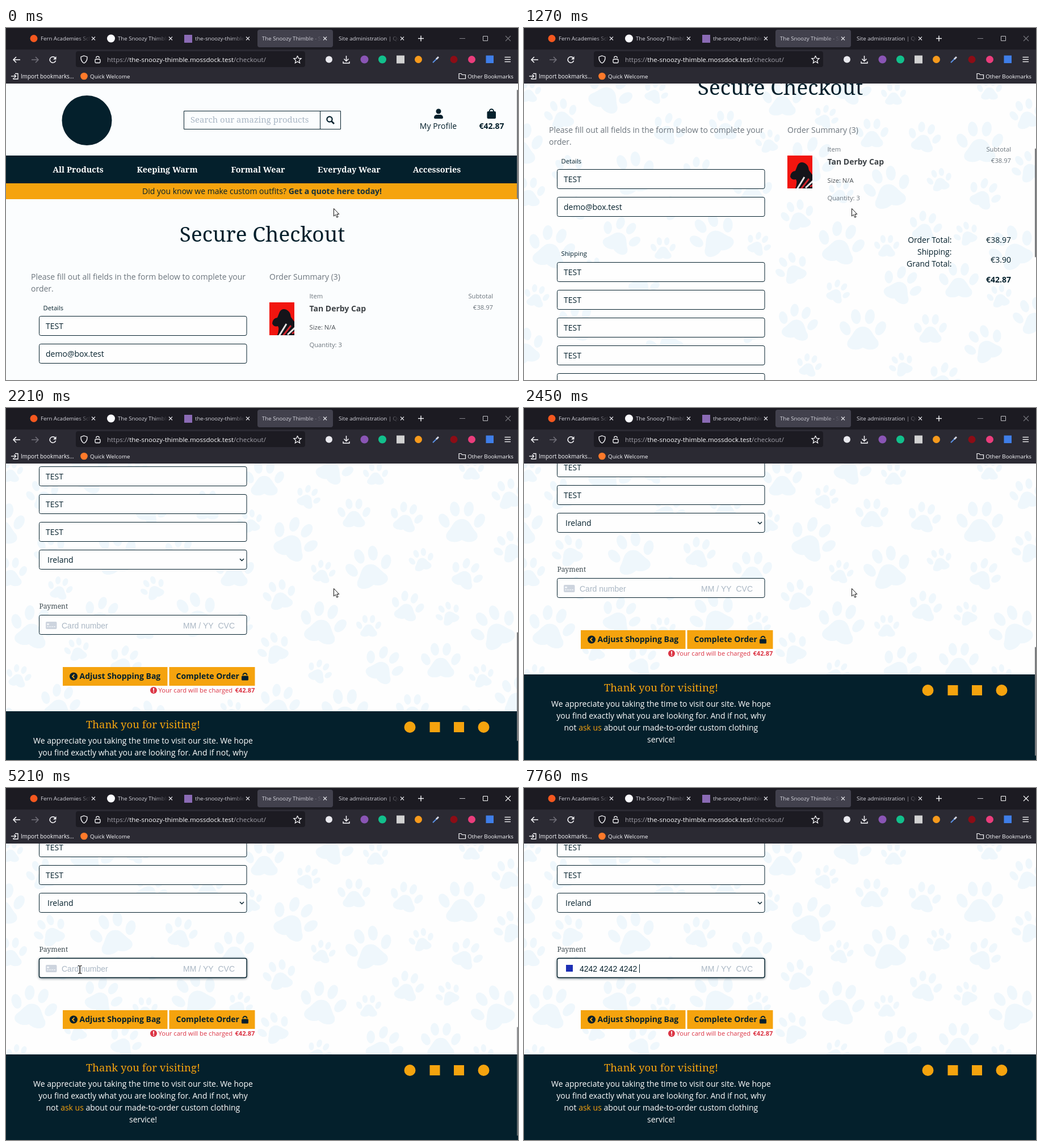
Animation, 902 px wide and 621 px high, one loop 8 s. Source, as an HTML page with a canvas:

```html
<!DOCTYPE html>
<html lang="en">
<head>
<meta charset="utf-8">
<title>Checkout</title>
<style>
html, body { margin: 0; width: 100%; height: 100%; overflow: hidden; background: #fefefe; }
canvas { display: block; }
</style>
</head>
<body>
<canvas id="stage" width="902" height="621"></canvas>
<script>
const c = document.getElementById('stage').getContext('2d');
const LOOP = 8000, TOP = 98, W = 902, H = 621;
const SANS = '"Open Sans", sans-serif', SERIF = '"Noto Serif", serif', ARIAL = '"Liberation Sans", sans-serif';
const INK = '#04202c', AMBER = '#f5a30e', GREY = '#6c757d', RED = '#dc3545', LIGHT = '#fbfbfe';

// Timelines: [time, value...]; each value holds until the next one
const SCROLL = [[0, 0], [880, 69], [1000, 100], [1150, 169], [1270, 259], [1390, 300], [1540, 369],
  [1660, 401], [1810, 470], [1930, 501], [2090, 570], [2210, 716], [2330, 769], [2450, 781]];
const POINTER = [[0, 577, 318, 'arrow'], [2600, 330, 317, 'beam'], [2720, 160, 317, 'beam'],
  [2870, 83, 317, 'beam'], [3120, 94, 318, 'beam'], [3240, 106, 319, 'beam'], [3360, 118, 320, 'beam'],
  [3480, 123, 320, 'beam'], [4680, 130, 320, 'beam'], [5480, 0, 0, 'none']];
const TYPED = [[0, 0], [5480, 1], [5730, 2], [5990, 3], [6110, 5], [6390, 6], [6510, 7],
  [6790, 8], [6940, 10], [7240, 11], [7360, 12], [7640, 13], [7760, 15]];
const CARET = [[0, 0], [4410, 1], [4960, 0], [5480, 1], [7090, 0], [7240, 1]];
const FOCUS = [[0, 0], [4410, 0.5], [4530, 1]];
const THUMB = [[0, 1], [5210, 0.8], [5330, 0.4], [5480, 0]];
const CARD = '4242 4242 4242 ';

const PAWS = {
  22: [651, 117, 532, 157, 732, 268, 558, 289, 779, 363, 639, 385, 552, 465, 838, 473, 502, 595, 665, 594,
    820, 108, 232, 113, 430, 200, 95, 318, 259, 318, 245, 389, 413, 381, 125, 426, 22, 473, 395, 535, 8, 112],
  29: [613, 186, 811, 293, 482, 330, 707, 350, 472, 424, 716, 531, 741, 618, 65, 152, 308, 255, 78, 252,
    8, 290, 210, 447, 885, 152, 705, 193, 888, 245, 355, 172, 255, 178],
  35: [766, 446, 665, 454, 897, 508, 482, 520, 811, 558, 402, 285, 170, 367, 0, 562, 95, 520, 250, 550, 455, 125, 577, 102],
  41: [803, 202, 508, 232, 640, 282, 558, 380, 860, 388, 597, 533, 150, 112, 190, 257, 48, 387, 333, 365, -8, 205]
};

const at = (list, t) => list.reduce((now, step) => step[0] <= t ? step : now);

function rect(x, y, w, h, fill, r = 0) {
  c.fillStyle = fill;
  c.beginPath();
  c.roundRect(x, y, w, h, r);
  c.fill();
}
function frame(x, y, w, h, color, width = 1, r = 0) {
  c.strokeStyle = color;
  c.lineWidth = width;
  c.beginPath();
  c.roundRect(x, y, w, h, r);
  c.stroke();
}
function disc(x, y, r, fill) {
  c.fillStyle = fill;
  c.beginPath();
  c.arc(x, y, r, 0, 7);
  c.fill();
}
function ring(x, y, r, color, width, from = 0, to = 7) {
  c.strokeStyle = color;
  c.lineWidth = width;
  c.beginPath();
  c.arc(x, y, r, from, to);
  c.stroke();
}
// Polyline from flat coordinates
function line(pts, color, width = 1.2) {
  c.strokeStyle = color;
  c.lineWidth = width;
  c.beginPath();
  for (let i = 0; i < pts.length; i += 2) c.lineTo(pts[i], pts[i + 1]);
  c.stroke();
}
function poly(d, fill) {
  c.fillStyle = fill;
  c.fill(new Path2D(d));
}
// y is the middle of the capitals
function text(s, x, y, size, color, { face = SANS, weight = 400, align = 'left' } = {}) {
  c.font = `${weight} ${size}px ${face}`;
  c.textAlign = align;
  c.fillStyle = color;
  c.fillText(s, x, Math.round(y + size * 0.36));
  return c.measureText(s).width;
}
function runs(x, y, size, parts) {
  for (const [s, color, weight = 400] of parts) x += text(s, x, y, size, color, { weight });
}

function paw(x, y, r, tilt) {
  c.save();
  c.translate(x, y);
  c.rotate(tilt);
  c.scale(r, r);
  poly('M0-.15C.35-.15.4.2.62.42C.85.8.3.95 0 .75C-.3.95-.85.8-.62.42C-.4.2-.35-.15 0-.15Z', '#eff7fc');
  for (const side of [-1, 1]) {
    for (const [tx, ty, turn] of [[0.76, -0.08, 0.5], [0.3, -0.58, 0.15]]) {
      c.beginPath();
      c.ellipse(tx * side, ty, 0.21, 0.32, turn * side, 0, 7);
      c.fill();
    }
  }
  c.restore();
}
function wallpaper() {
  for (const size in PAWS) {
    const spots = PAWS[size];
    for (let i = 0; i < spots.length; i += 2) paw(spots[i], spots[i + 1], +size, ((i * 3.5 + 2) % 5 - 2) * 0.24);
  }
}

function header() {
  disc(142.5, 163, 44, INK);
  frame(313.5, 146.5, 276, 32, INK);
  line([553.5, 146, 553.5, 179], INK, 1);
  text('Search our amazing products', 325, 162, 14.9, '#a9b6c4', { face: SERIF });
  ring(570, 161, 4.6, INK, 2.2);
  line([573.5, 164.5, 578, 169], INK, 2.6);
  disc(762, 147, 4.5, INK);
  rect(754, 153, 16, 7, INK, [5, 5, 2, 2]);
  text('My Profile', 761.5, 172.5, 14, INK, { align: 'center' });
  rect(847.5, 147, 15.5, 13, INK, 2);
  ring(855.3, 147, 3.7, INK, 2, Math.PI, 0);
  text('€42.87', 855.5, 172.5, 14, INK, { weight: 700, align: 'center' });

  rect(0, 225, W, 49, INK);
  const menu = [['All Products', 127], ['Keeping Warm', 284], ['Formal Wear', 444], ['Everyday Wear', 604.5], ['Accessories', 759]];
  for (const [s, x] of menu) text(s, x, 249.5, 14.4, '#fdfdfd', { face: SERIF, weight: 700, align: 'center' });
  rect(0, 274, W, 28, AMBER);
  runs(240, 288, 14, [['Did you know we make custom outfits? ', INK], ['Get a quote here today!', '#17303a', 700]]);
}

function field(y, value, x = 70) {
  rect(58.5, y + 0.5, 365.5, 34, '#fefefe', 3);
  frame(58.5, y + 0.5, 365.5, 34, INK, 1, 3);
  text(value, x, y + 17.5, 14, INK);
}

function form() {
  text('Secure Checkout', 451.5, 364, 37, INK, { face: SERIF, align: 'center' });
  text('Please fill out all fields in the form below to complete your', 44, 439, 14, GREY);
  text('order.', 44, 460, 14, GREY);
  text('Details', 65.5, 493.5, 11.2, INK);
  field(508, 'TEST');
  field(557, 'demo@box.test');
  text('Shipping', 65.5, 657, 11.2, INK);
  for (let i = 0; i < 6; i++) field(672 + i * 49, 'TEST');
  field(966, 'Ireland', 73);
  line([412, 982, 415.5, 985.5, 419, 982], INK, 1.5);
}

function photo() {
  c.save();
  c.beginPath();
  c.rect(464, 484, 44, 58);
  c.clip();
  rect(464, 484, 44, 58, '#f2150f');
  poly('M469 521Q470 512 478 511L482 501Q486 494 494 497Q501 500 502 510L508 518V542H478Q482 530 479 526Q471 528 469 521Z', '#15141a');
  for (let i = 0; i < 4; i++) {
    line([480 + i * 8, 545 - i * 2, 494 + i * 8, 522 + i * 3], i % 2 ? '#d2232b' : '#e8e4e4', 3);
  }
  c.restore();
}

function summary() {
  text('Order Summary (3)', 464, 439, 14, GREY);
  text('Item', 534.5, 472.5, 11.2, GREY);
  text('Subtotal', 858, 472.5, 11.2, GREY, { align: 'right' });
  photo();
  text('Tan Derby Cap', 534.5, 494.5, 14, '#3d4246', { weight: 700 });
  text('€38.97', 858, 493, 11.2, GREY, { align: 'right' });
  text('Size: N/A', 534.5, 528, 11.2, '#4a5055');
  text('Quantity: 3', 534.5, 558.5, 11.2, GREY);
  const right = { align: 'right' };
  ['Order Total:', 'Shipping:', 'Grand Total:'].forEach((s, i) => text(s, 753.5, 633 + i * 21, 14, INK, right));
  text('€38.97', 858, 633, 14, INK, right);
  text('€3.90', 858, 668, 14, INK, right);
  text('€42.87', 858, 703, 14, INK, { weight: 700, align: 'right' });
}

function payment(t) {
  const count = at(TYPED, t)[1], focus = at(FOCUS, t)[1];
  text('Payment', 58.5, 1066, 12.1, '#3d4a50', { face: SERIF });
  c.save();
  c.shadowColor = `rgba(4,32,44,${0.75 * focus})`;
  c.shadowBlur = 5;
  c.shadowOffsetY = 1;
  rect(58.5, 1081.5, 365.5, 34, '#fefefe', 3);
  c.restore();
  frame(58.5, 1081.5, 365.5, 34, INK, 1 + focus * 0.4, 3);

  const value = CARD.slice(0, count), y = 1099.5, hint = '#aab7c4';
  if (count) {
    rect(74, 1093, 12, 12, '#1c2fb4');
  } else {
    rect(70, 1093, 19.5, 13, '#cdd4de', 2);
    rect(72, 1096, 4, 3, '#eef1f5');
    for (let i = 0; i < 4; i++) rect(72 + i * 4, 1101, 3, 1.5, '#eef1f5');
  }
  const end = text(value || 'Card number', 98, y, 14, count ? INK : hint, { face: ARIAL });
  text('MM / YY', 312, y, 14, hint, { face: ARIAL });
  text('CVC', 373.5, y, 14, hint, { face: ARIAL });
  if (at(CARET, t)[1]) rect(98 + Math.floor(count ? end : 0), 1092, 1, 15, INK);

  rect(100, 1173, 184.5, 33, AMBER);
  rect(287.5, 1173, 151, 33, AMBER);
  disc(119, 1189.5, 7, INK);
  line([120.5, 1186, 117, 1189.5, 120.5, 1193], AMBER, 1.8);
  text('Adjust Shopping Bag', 129.5, 1189, 14, INK, { weight: 700 });
  text('Complete Order', 299.5, 1189, 14, INK, { weight: 700 });
  rect(415, 1188.5, 12, 8, INK, 1.5);
  ring(421, 1187.5, 3.5, INK, 1.9, Math.PI, 0);
  disc(260, 1214, 6, RED);
  rect(259.2, 1210, 1.8, 5, '#fff');
  rect(259.2, 1216, 1.8, 1.8, '#fff');
  text('Your card will be charged', 268.5, 1214, 11.2, RED);
  text('€42.87', 438.5, 1214, 11.2, RED, { weight: 700, align: 'right' });
}

function footer() {
  rect(0, 1251, W, 160, INK);
  const mid = { align: 'center' };
  text('Thank you for visiting!', 241.5, 1274, 18.5, AMBER, { face: SERIF, align: 'center' });
  text('We appreciate you taking the time to visit our site. We hope', 241.5, 1303, 14, '#fff', mid);
  text('you find exactly what you are looking for. And if not, why', 241.5, 1324, 14, '#fff', mid);
  runs(70.5, 1345, 14, [['not ', '#fff'], ['ask us', AMBER], [' about our made-to-order custom clothing', '#fff']]);
  text('service!', 241.5, 1366, 14, '#fff', mid);
  disc(711.5, 1279, 10, AMBER);
  rect(746.5, 1270, 18, 18, AMBER);
  rect(789, 1270, 18, 18, AMBER);
  disc(841.5, 1279, 10, AMBER);
}

function tabs(active) {
  rect(0, 0, W, 38, '#1c1b22');
  rect(443, 3, 133, 31, '#42414d', 4);
  disc(49, 18.5, 6.5, '#f4581f');
  disc(185, 18.5, 7, '#fbfbfe');
  rect(314, 12, 14, 14, '#8b6bb5');
  const titles = [['Fern Academies School', 61], ['The Snoozy Thimble', 197], ['the-snoozy-thimble', 333],
    ['The Snoozy Thimble - Shop', 451], ['Site administration | Quill', 586]];
  titles.forEach(([s, x], i) => {
    const end = 149 + i * 136, fade = c.createLinearGradient(end - 24, 0, end, 0);
    fade.addColorStop(0, '#d4d4dc');
    fade.addColorStop(1, 'rgba(212,212,220,0)');
    text(s, x, 19, 9.7, fade);
    cross(154 + i * 136, 18.5, 3, '#e4e4ea');
  });
  line([726, 18.5, 736, 18.5], LIGHT, 1.4);
  line([731, 13.5, 731, 23.5], LIGHT, 1.4);
  line([799, 18.5, 809, 18.5], active ? '#c8c8cc' : '#85858c', 1);
  frame(840.5, 14.5, 8, 8, active ? '#fff' : '#c0c0c5', 1);
  cross(884.5, 18.5, 4.5, active ? '#fff' : '#77777e');
}
function cross(x, y, r, color) {
  line([x - r, y - r, x + r, y + r], color, 1.1);
  line([x - r, y + r, x + r, y - r], color, 1.1);
}

function toolbar() {
  rect(0, 38, W, 60, '#2b2a33');
  for (const [x, dir, color] of [[19, 1, LIGHT], [51, -1, '#73727b']]) {
    line([x - 6, 56, x + 6, 56], color, 1.5);
    line([x - dir, 51, x - 6 * dir, 56, x - dir, 61], color, 1.5);
  }
  ring(82.5, 56, 5.3, LIGHT, 1.5, 0.3, 5.5);
  poly('M88.5 50V55.5H83Z', LIGHT);

  rect(123, 41, 404, 28, '#1c1b22', 4);
  c.strokeStyle = LIGHT;
  c.lineWidth = 1.3;
  c.stroke(new Path2D('M137.5 49L143 51Q143.500 59 137.500 62Q131.500 59 132 51Z'));
  frame(157, 55, 9, 6.5, LIGHT, 1.3, 1.5);
  ring(161.5, 53, 2.8, LIGHT, 1.3, Math.PI, 0);
  const dim = '#a3a2ab';
  runs(178, 56, 11.5, [['https://', dim], ['the-snoozy-thimble.mossdock.test', LIGHT], ['/checkout/', dim]]);
  const star = [];
  for (let i = 0; i <= 10; i++) {
    const a = i * Math.PI / 5, r = i % 2 ? 3.2 : 7;
    star.push(513.5 + r * Math.sin(a), 56 - r * Math.cos(a));
  }
  line(star, LIGHT, 1.2);

  disc(569, 55.5, 6, '#e9e9ee');
  line([599.5, 49, 599.5, 58], LIGHT, 1.5);
  line([595.5, 54.5, 599.5, 58.5, 603.5, 54.5], LIGHT, 1.5);
  line([594, 59, 594, 62, 605, 62, 605, 59], LIGHT, 1.4);
  disc(631.5, 55.5, 7, '#8a55b5');
  disc(663, 55.5, 7, '#12c08c');
  rect(688, 48.5, 14, 14, '#d2d2d2');
  disc(726.5, 55.5, 6.5, '#f79a1c');
  line([752, 61, 759, 54], '#5b8fe0', 2.2);
  line([758, 55, 762, 51], '#d5d8e5', 3);
  disc(789, 55.5, 6.5, '#8c0d16');
  disc(820.5, 55.5, 6.5, '#ea3d7c');
  rect(845.5, 48.5, 13.5, 13.5, '#3f7ee8');
  for (let i = 0; i < 3; i++) line([878.5, 51.5 + i * 4, 889, 51.5 + i * 4], LIGHT, 1.3);

  line([16, 80.5, 21, 80.5, 21, 90, 13, 90, 13, 88], LIGHT, 1.3);
  line([9, 85, 17.5, 85], LIGHT, 1.3);
  line([14.5, 82, 17.5, 85, 14.5, 88], LIGHT, 1.3);
  text('Import bookmarks...', 26, 85.5, 9.9, LIGHT);
  disc(137.5, 85, 6.3, '#ff7a2a');
  text('Quick Welcome', 148, 85.5, 9.8, LIGHT);
  line([798, 89.5, 798, 80.5, 802, 80.5, 803.5, 82.5, 809.5, 82.5, 809.5, 89.5, 797.5, 89.5], LIGHT, 1.2);
  text('Other Bookmarks', 894, 85.5, 9.8, LIGHT, { align: 'right' });
}

function pointer(x, y, kind) {
  if (kind === 'arrow') {
    const shape = new Path2D(`M${x + 0.5} ${y + 0.5}v13.500l3-2.800 2.300 5 2.200-1-2.200-4.800h4z`);
    c.fillStyle = '#fff';
    c.fill(shape);
    c.strokeStyle = '#111';
    c.lineWidth = 1;
    c.stroke(shape);
  } else if (kind === 'beam') {
    rect(x - 0.5, y - 6, 1.5, 13, '#111');
    for (const edge of [y - 7, y + 6.5]) {
      rect(x - 3, edge, 2.7, 1.2, '#111');
      rect(x + 0.8, edge, 2.7, 1.2, '#111');
    }
  }
}

function draw(t) {
  const scroll = at(SCROLL, t)[1], patterned = t >= 1150;
  rect(0, 0, W, H, patterned ? '#fefefe' : '#fbfdfe');
  if (patterned) wallpaper();
  c.save();
  c.translate(0, -scroll);
  header();
  form();
  summary();
  payment(t);
  footer();
  c.restore();
  c.globalAlpha = at(THUMB, t)[1];
  rect(900, TOP + 11 + scroll * 0.4, 2, 192, '#77797c', 1);
  c.globalAlpha = 1;
  tabs(t >= 3240);
  toolbar();
  pointer(...at(POINTER, t).slice(1));
}

const start = performance.now();
function tick() {
  draw((performance.now() - start) % LOOP);
  requestAnimationFrame(tick);
}
tick();
</script>
</body>
</html>
```
